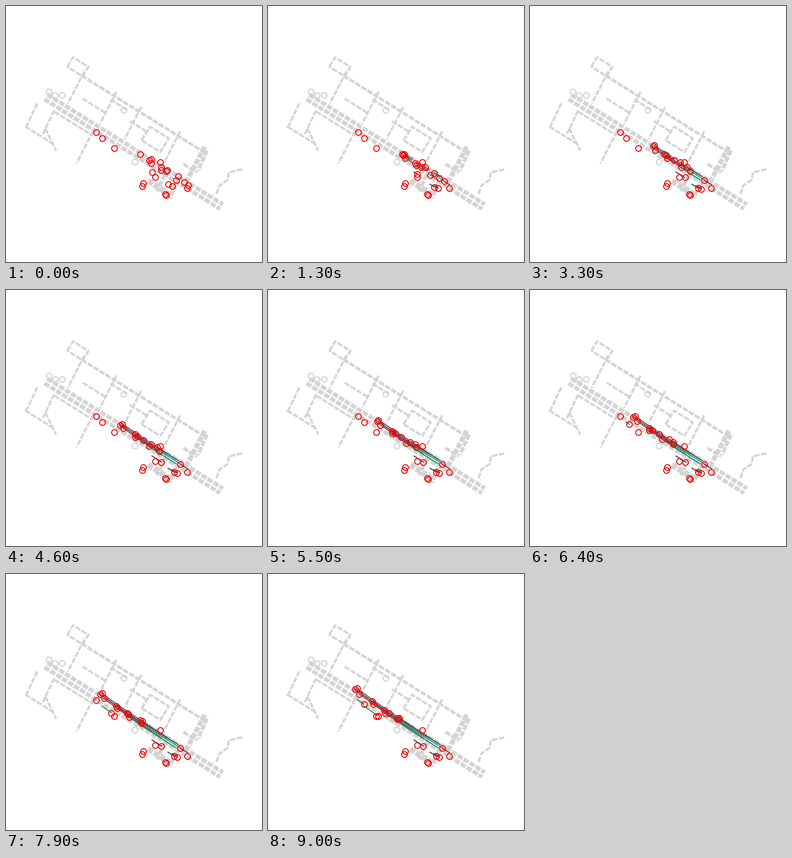
Write a matplotlib script that moves like this. It is 256 px wide and 256 px high and loops after 9.1 s.

```python
import numpy as np
import matplotlib.pyplot as plt
from matplotlib.animation import FuncAnimation

SIZE, DPI = 256, 100
FRAMES, STEP = 91, 100
PX = 72 / DPI
GRAY = "#d3d3d3"
COLORS = ["#b02a30", "#56627a", "#8a5044", "#404850"]
GREEN, TEAL = "#22905a", "#10b090"

fig = plt.figure(figsize=(SIZE / DPI, SIZE / DPI), dpi=DPI, facecolor="white")
ax = fig.add_axes([0, 0, 1, 1])
ax.set_xlim(0, SIZE)
ax.set_ylim(SIZE, 0)
ax.axis("off")


def town(u, v):
    """Town plan (along the avenue, north of it) to stage pixels."""
    return 40 + 0.848 * u + 0.53 * v, 91 + 0.53 * u - 0.848 * v


def road(*points, width=2.2, dash=5.5):
    u, v = np.array(points).T
    ax.plot(*town(u, v), color=GRAY, lw=width * PX,
            ls=(0, (dash / width, 1.5 / width)), dash_capstyle="butt", zorder=1)


def along(v, start, end, width=2.2):
    road((start, v), (end, v), width=width)


def across(u, start, end, width=2.2):
    road((u, start), (u + 3, end), width=width)


def block(u0, u1, v0, v1):
    road((u0, v0), (u0, v1), (u1, v1), (u1, v0), (u0, v0))


# Avenue and the road parallel to it
for v in (2.7, -2.7):
    along(v, 0, 207, 4)
along(37, 19, 166, 2.8)

# North side
for u in (19, 57, 86, 132):
    across(u, 42, 6)
across(161, 42, 2, 4.8)
across(165, 40, 18, 3.5)
along(16, 152, 168, 3)
along(18, 32, 60)
along(32, 56, 77)
along(24, 84, 104)
block(104, 126, 14, 30)
block(2, 20, 37, 48)
road((196, 8), (194, 17), (198, 26), (195, 33), (205, 43))

# South side
across(-4, -10, -36)
across(14, -7, -33)
across(58, -4, -40)
along(-8, 15, 60)
along(-36, -2, 31)
road((16, -27), (37, -40))

# Station
along(-17, 131, 157, 6)
across(141, 4, -21, 3.5)
across(156, -5, -20, 4)

for u, v in [(0, 6), (7, 6), (13, 10), (73, 30), (110, -8)]:
    ax.add_patch(plt.Circle(town(u, v), 2.8, fill=False, ec=GRAY, lw=1.2 * PX))


def route(x):
    """Gently bending line that traffic follows."""
    d = x - 134
    return 148 + 0.67 * d - 0.0007 * d ** 2


def drive(x, lane, speed, leave=0, stop=9):
    """Path at constant westward speed (px/s) between leaving and stopping."""
    t = np.arange(FRAMES) * STEP / 1000
    xs = x - speed * (np.clip(t, leave, stop) - leave)
    return np.column_stack([xs, route(xs) + lane])


# Westbound platoon: x, lane offset, speed
platoon = [(143, 0, 6.2), (144.5, -2, 6.2), (145, 1.7, 6), (154.5, 0, 5.6),
           (155, 2, 5.6), (159.5, 0, 4.8), (161, -2, 3.4), (172, -2, 4.6)]
cars = [(COLORS[i % 4], drive(*car)) for i, car in enumerate(platoon)]
cars += [
    (GREEN, drive(170, 2.5, 5.9)),
    (TEAL, drive(178, 0, 5.4)),
    (COLORS[0], drive(182, 0.5, 4.6, stop=1.7)),
    (COLORS[1], drive(134, 0, 5.2, 4.1, 6.6)),
    (COLORS[3], drive(146, 10, -2.6, stop=3.6)),
    (COLORS[3], drive(162, 12, -3, stop=2)),
    (COLORS[3], drive(166, 11, -3, stop=1.7)),
    (GREEN, drive(89.5, 9, -5, 7.8)),
    (GREEN, drive(96, 10.5, -4, 5.6)),
]
parked = [(108, 142), (153.5, 156), (149, 171), (136.5, 176.5), (136, 180),
          (159.3, 188), (160, 189), (181, 182)]

trails = [ax.plot([], [], color=color, lw=1.1 * PX, zorder=2)[0]
          for color, _ in cars]
rings, = ax.plot([], [], "o", ms=5.7 * PX, mfc="none", mec="#ee0000",
                 mew=PX, zorder=3)


def update(i):
    for trail, (_, path) in zip(trails, cars):
        trail.set_data(*path[:i + 1].T)
    spots = np.array([path[i] for _, path in cars] + parked)
    rings.set_data(*spots.T)
    return [*trails, rings]


anim = FuncAnimation(fig, update, frames=FRAMES, interval=STEP,
                     init_func=lambda: update(0), repeat=True, repeat_delay=0)
plt.show()
```
